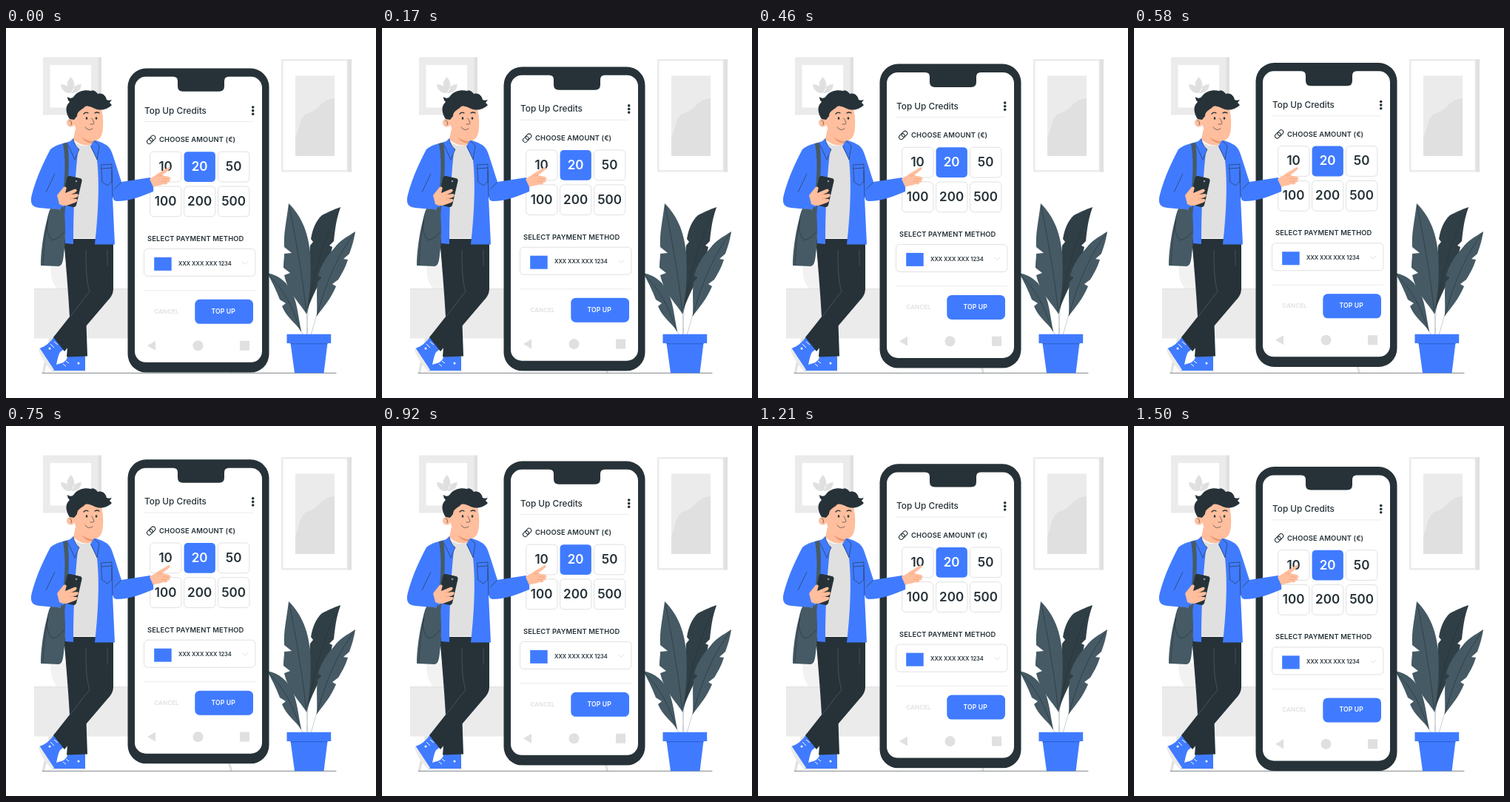
Animation of 500x500 px, one loop 1540 ms. Source, as an HTML page:

```html
<!DOCTYPE html>
<html lang="en">
<head>
<meta charset="utf-8">
<title>Top Up Credits</title>
<style>
  html, body { margin: 0; height: 100%; overflow: hidden; background: #fff; }
  svg { display: block; width: 100vw; height: 100vh; }
  text { font-family: Inter, "Open Sans", sans-serif; font-weight: 600; fill: #263238; }
  .mid { text-anchor: middle; }
  .cap { font-size: 9.4px; letter-spacing: .13px; }
  .num { font-size: 17px; text-anchor: middle; }
  .blue { fill: #407bff; }
  .dark { fill: #263238; }
  .slate { fill: #455a64; }
  .shade { fill: #303f46; }
  .skin { fill: #ffbe9d; }
  .g1 { fill: #ebebeb; }
  .g2 { fill: #e0e0e0; }
  .white { fill: #fff; }
  .ink { fill: none; stroke: #263238; stroke-width: .6; stroke-linecap: round; stroke-linejoin: round; }
  .fold { fill: none; stroke: #eb996e; stroke-width: .6; }
  .rule { fill: none; stroke: #e0e0e0; stroke-width: 1; }
</style>
</head>
<body>
<svg viewBox="0 0 500 500">
  <!-- wall and table -->
  <g>
    <path class="g1" d="M50 39.500H125V117.500H50Z"/>
    <path class="g2" d="M124.500 39.500H129V117.500H124.500Z"/>
    <path class="white" d="M59.500 50H115V107.500H59.500Z"/>
    <path class="g2" d="M87.500 66C94 73 94 81 88 88C81 81 81 73 87.500 66ZM74 76C82 76 87 81 87 88C79 88 75 84 74 76ZM102 76C94 76 89 81 89 88C97 88 101 84 102 76Z"/>

    <path class="g1" d="M372 42H463V194.500H372Z"/>
    <path class="g2" d="M462 42H467V194.500H462Z"/>
    <path class="white" d="M374.500 44.500H460.500V192H374.500Z"/>
    <path class="g1" d="M391 64.500H444V173H391Z"/>
    <path class="g2" d="M391 147C398 139 394 120 409 115C424 111 424 97 444 95V173H391Z"/>

    <path fill="#f2f2f2" d="M61 320H106C109 334 104 346 97 352H69C62 344 59 332 61 320Z"/>
    <path class="g1" d="M38 352H300V419.500H38Z"/>
    <path class="rule" d="M38 352.500H300"/>
    <path class="g2" d="M58 419.500H63L52 466H49ZM289 419.500H294L306 466H303Z"/>
    <path class="ink" d="M49 466.300H446" stroke-linecap="butt"/>
  </g>

  <!-- plant -->
  <g>
    <path fill="none" stroke="#c9d0d3" stroke-width="1" d="M406 385L408 415M420 387L412 415M397 407L402 415M408 385L406 415"/>
    <path class="shade" d="M452 242C441 246 435 249 427 253C419 260 414 272 412 285L415 289L411 294C409 318 409 350 406 386C410 371 418 355 427 337L424 334L431 328C435 318 438 309 441 296L437 294L443 288C445 270 446 260 452 242Z"/>
    <path class="slate" d="M382 237C397 252 408 272 411 304C413 335 411 360 406 386C396 371 381 357 376 334L384 331L375 324C375 316 376 311 376 305L386 304L376 296C375 276 379 262 382 237Z"/>
    <path class="slate" d="M472 275C460 283 451 287 444 297C433 309 425 321 422 335L427 337L421 343C419 358 421 372 420 389C430 376 439 366 446 349L441 346L449 340C455 330 459 323 462 313L456 312L464 305C468 294 470 287 472 275Z"/>
    <path class="slate" d="M353 331C369 334 381 344 388 360C394 375 395 391 399 410C391 398 379 391 373 376L378 372L370 367C365 354 359 342 353 331Z"/>
    <path class="ink" d="M383 241C390 278 400 328 406 386M451 244C427 287 417 332 407 385M471 277C445 311 431 350 420 389M355 334C377 355 389 381 398 409"/>
    <path class="blue" d="M379.500 413.700H439.200V426H379.500ZM384.500 426H434.500L429.500 466.300H390Z"/>
    <path fill="#2f62d8" d="M384.500 426H434.500L434.300 427.200H384.700Z"/>
  </g>

  <!-- phone -->
  <g id="phone">
    <rect class="dark" x="164.500" y="54.700" width="191" height="411" rx="25"/>
    <path class="white" d="M189 66H226Q232 66 232 72V79Q232 86 239 86H288Q295 86 295 79V72Q295 66 301 66H331A15 15 0 0 1 346 81V437A15 15 0 0 1 331 452H189A15 15 0 0 1 174 437V81A15 15 0 0 1 189 66Z"/>
    <text x="187" y="115.700" font-size="11.800" style="font-weight:500">Top Up Credits</text>
    <g class="dark"><circle cx="333.700" cy="107.200" r="1.800"/><circle cx="333.700" cy="111.800" r="1.800"/><circle cx="333.700" cy="116.400" r="1.800"/></g>
    <path class="rule" style="stroke:#ebebeb" d="M186 126.500H334M187 355H337"/>
    <g class="ink" style="stroke-width:1" transform="rotate(-45 196 151.200)">
      <rect x="189.500" y="148.200" width="8.500" height="6" rx="3"/>
      <rect x="194.500" y="148.200" width="8.500" height="6" rx="3"/>
    </g>
    <text class="cap" x="207" y="154.400">CHOOSE AMOUNT (€)</text>
    <g id="cards"></g>
    <text class="cap" x="191" y="287.900">SELECT PAYMENT METHOD</text>
    <rect class="rule" x="186.500" y="298.500" width="150.500" height="37" rx="5"/>
    <path class="blue" d="M200.200 310H223.700V328H200.200Z"/>
    <text x="233" y="320.700" font-size="7.500">XXX XXX XXX 1234</text>
    <path class="rule" d="M319 315.900L323 319.500L327 315.900"/>
    <text class="mid" x="217" y="385.900" font-size="8" style="fill:#e0e0e0;letter-spacing:.1px">CANCEL</text>
    <rect class="blue" x="255.300" y="367" width="78.700" height="33" rx="6.500"/>
    <text class="mid" x="293.800" y="386" font-size="8.600" style="fill:#fff;letter-spacing:.15px">TOP UP</text>
    <path class="g2" d="M191 429.400L202 422.900V435.900ZM316 422.900H329V435.900H316Z"/>
    <circle class="g2" cx="259.500" cy="429.400" r="7"/>
  </g>

  <!-- man -->
  <g>
    <!-- shoes and legs -->
    <path class="blue" d="M84 442H107V463H63C62 457 68 454 75 453C80 451 83 447 84 442Z"/>
    <path class="g1" d="M62.500 463H107.500V466H62Z"/>
    <path class="dark" d="M78 285H123L114 351L108 385L110 443.500L82 444.500L86 390C84 355 81 320 78 285Z"/>
    <path class="blue" d="M66 415L81 432L73 438C69 445 69 455 66 462L62 462L45 433C52 431 61 425 66 415Z"/>
    <path class="g1" d="M45.500 432.500L65 462L63 464.500C56 458 47 446 44 435Z"/>
    <path class="dark" d="M97 285H145V352C145 359 142 364 137 369L79 437L64 418L109 361C107 340 107 320 105 300Z"/>
    <path class="ink" style="stroke:#546a75" d="M108 301C108 328 109 345 113 356L86 391M137 300V321"/>
    <path stroke="#fff" stroke-width="1" d="M77 454L81 457M81 450L85 453M60 427L65 432M65 424L70 428"/>
    <g class="white"><circle cx="98" cy="453" r="1.500"/><circle cx="59" cy="433" r="1.500"/></g>

    <!-- torso -->
    <path class="g2" d="M88 150C98 161 112 162 119 153L127 170V284H90Z"/>
    <path class="blue" d="M90 152C78 156 66 158 60 164C51 181 41 202 35 225C32 237 35 242 45 243L78 246L80 291L91 292C91 255 92 215 97 168Z"/>
    <path class="blue" d="M119 151C130 155 139 157 143 168C148 182 152 196 156 208L195 202C198 208 200 215 199 221C182 228 166 234 150 234C146 234 145 231 144 228L147 292.500H120C125 250 127 205 122 170Z"/>
    <path class="ink" d="M143 192L144 228M129 185L143 184V208L137 213L130 208ZM129 190L143 189M66 197L54 222M147 217L155 209"/>

    <!-- neck and head -->
    <path class="skin" d="M94 136L117 145L119 155C112 161 99 159 91 150Z"/>
    <path fill="#eb996e" d="M102 147C107 151 112 153 118 153L118.500 156C110 156 105 152 102 147Z"/>
    <path class="blue" d="M91 149C92 156 95 161 99 164L93 178L83 157ZM119 151L126 159L123 178L114 160Z"/>
    <path class="ink" d="M91 150C92 156 95 161 99 164L93 178L84 158M119 152L126 159L123 178L115 160"/>
    <circle class="skin" cx="87.500" cy="128" r="5.500"/>
    <path class="skin" d="M93 111C103 100 122 101 129 110C132 121 132 137 129 145C126 153 116 155 107 149C98 145 94 137 92 129Z"/>
    <path class="dark" d="M86 123C81 116 79 106 86 100C84 98 83 96 83 93C87 96 90 95 92 92C97 85 107 83 115 85C118 83 122 86 124 89C131 87 135 92 136 97C138 98 140 98 143 97L140 101L143 104C137 110 128 113 118 108C113 106 109 104 106 107C102 111 96 112 96 119L92 124Z"/>
    <path class="ink" d="M105 116Q108 113 111 115M120 115Q123 113 126 115" style="stroke-width:1.300"/>
    <path class="ink" d="M116 122C118 126 120 129 118 130L114 130M107 134Q111 140 117 136M86 125Q90 126 88 131"/>
    <g class="dark"><ellipse cx="109" cy="122" rx="1.300" ry="1.800"/><ellipse cx="122" cy="122" rx="1.300" ry="1.800"/></g>

    <!-- bag -->
    <path class="slate" d="M77 156L83 155C87 180 84 218 79 252L73 251C79 216 82 184 77 156Z"/>
    <path class="slate" d="M60 244L79 246C80 267 81 286 78 306C77 316 76 321 71 322L47 321C47 302 51 270 60 244Z"/>
    <path class="ink" d="M59 247C54 263 53 278 63 287C69 285 75 281 79 275M57 260C52 278 51 300 50 320"/>

    <!-- hand with small phone -->
    <path class="blue" d="M62 213L73 222L79 242L45 243Z"/>
    <rect class="dark" x="78.500" y="201" width="20.500" height="40" rx="3.500" transform="rotate(13 89 221)"/>
    <circle cx="95" cy="207" r="1.300" fill="#8a9aa2"/>
    <path class="skin" d="M69 226L77 216C80 213 83 215 81 219L80 223L92 218C96 217 97 220 94 222L88 225L96 224C99 225 98 228 95 229L90 231L95 231C98 232 96 235 93 236L85 239C80 241 76 240 72 238Z"/>
    <path class="fold" d="M94 222L85 226M95 229L86 231"/>

    <!-- pointing hand -->
    <path class="skin" d="M194 204L202 199C207 195 212 193 218 189C222 187 223 190 220 192L211 199L220 201C224 203 223 205 220 205C223 207 222 209 218 208C219 211 217 212 213 211C208 213 203 213 199 215Z"/>
    <path class="fold" d="M211 199L205 200M220 205L211 203M218 208L210 207"/>
  </g>
</svg>
<script>
  const LOOP = 1540, STEPS = 37, LOW = .4, HIGH = -9.6;

  const card = (label, i) => {
    const x = 194.6 + (i % 3) * 46, y = 167.3 + (i > 2 ? 46.8 : 0);
    const on = label === 20;
    return `<rect x="${x}" y="${y}" width="42.3" height="40.8" rx="5"
      class="${on ? "blue" : "rule"}"/>
      <text class="num" x="${x + 21}" y="${y + 25.9}"${on ? ' style="fill:#fff"' : ""}>${label}</text>`;
  };
  document.getElementById("cards").innerHTML =
    [10, 20, 50, 100, 200, 500].map(card).join("");

  // The phone floats up and down at constant speed, 24 steps a second.
  const shift = y => ({ transform: `translateY(${y}px)` });
  document.getElementById("phone").animate(
    [shift(LOW), shift(HIGH), shift(LOW)],
    { duration: LOOP, iterations: Infinity, delay: -4, easing: `steps(${STEPS}, start)` }
  );
</script>
</body>
</html>
```
